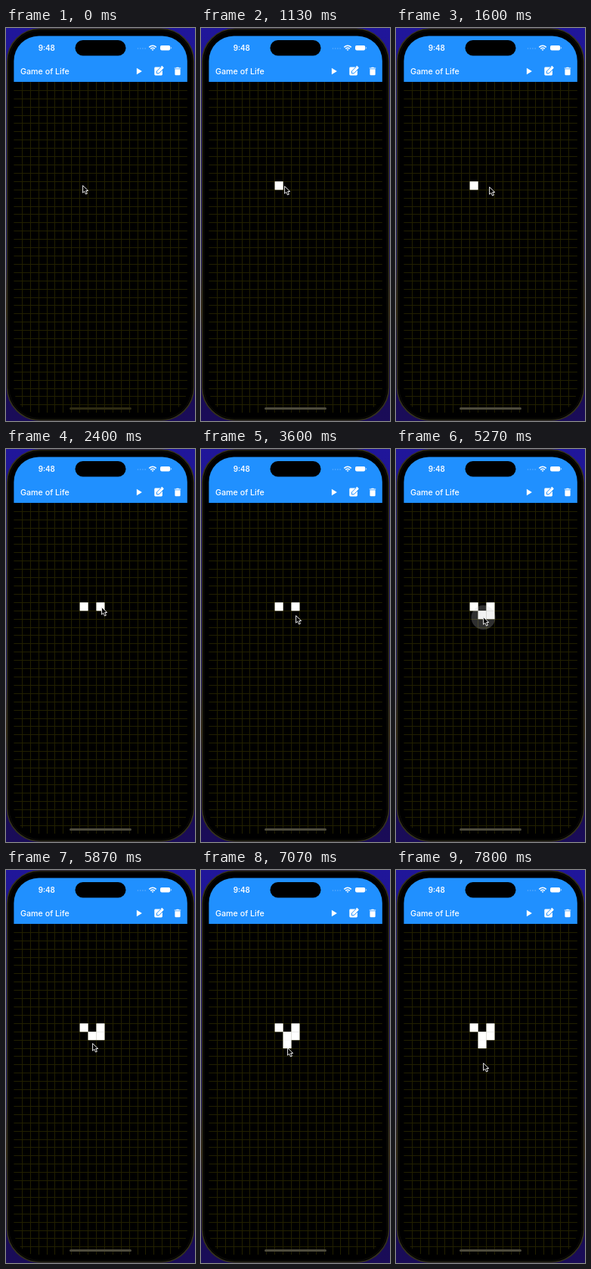
Animation, 250 px wide and 518 px high, one loop 8 s. Source, as an HTML page:

```html
<!DOCTYPE html>
<html lang="en">
<head>
<meta charset="utf-8">
<title>Game of Life</title>
<style>
  html, body { margin: 0; width: 100%; height: 100%; overflow: hidden; background: #000; }
  svg { display: block; width: 100vw; height: 100vh; }
  text { font-family: Inter, Roboto, sans-serif; fill: #fff; }
</style>
</head>
<body>
<svg viewBox="0 0 250 518">
  <defs>
    <linearGradient id="desk" x2="0" y2="1">
      <stop offset="0" stop-color="#20169a"/>
      <stop offset=".6" stop-color="#1c1478"/>
      <stop offset=".66" stop-color="#2c1c30"/>
      <stop offset=".72" stop-color="#342010"/>
      <stop offset=".78" stop-color="#180c50"/>
      <stop offset="1" stop-color="#1a0c58"/>
    </linearGradient>
    <clipPath id="screen"><rect x="10.4" y="10.4" width="229.4" height="497.6" rx="33"/></clipPath>
  </defs>

  <rect width="250" height="518" fill="url(#desk)"/>
  <rect x="1.6" y="1" width="246.8" height="516" rx="43" fill="#000" stroke="#35321c" stroke-width="1.6"/>
  <rect x="4" y="3.2" width="242" height="511.6" rx="40.5" fill="none" stroke="#15140c" stroke-width=".8"/>

  <g clip-path="url(#screen)">
    <path id="grid" stroke="#222000" fill="none" shape-rendering="crispEdges"/>
    <g id="cells" fill="#fff"></g>
    <rect x="10" y="10" width="230" height="61" fill="#2090ff"/>
  </g>
  <rect id="home" x="84" y="500" width="82" height="3" rx="1.5"/>

  <rect x="91.5" y="16" width="67" height="20.5" rx="10.2" fill="#000"/>
  <text x="42.7" y="30" font-size="9.8" font-weight="600">9:48</text>
  <text x="19" y="60.8" font-size="10.7" font-weight="500">Game of Life</text>

  <path d="M174.5 27h9.8" stroke="#fff" stroke-width="1.5" stroke-linecap="round"
    stroke-dasharray="0 3.2" opacity=".3"/>
  <g fill="none" stroke="#fff" stroke-width="1.5">
    <path d="M189.3 25.4Q194 21.2 198.7 25.4M191.2 27.4Q194 25 196.8 27.4"/>
    <path d="M192.6 28.4L194 30L195.4 28.4Q194 27.4 192.6 28.4Z" fill="#fff" stroke="none"/>
  </g>
  <rect x="204" y="23" width="13.2" height="6.4" rx="1.8" fill="#fff"/>
  <path d="M218.2 25v2.4q1-.3 1-1.2t-1-1.2Z" fill="#fff" opacity=".7"/>

  <g fill="#fff">
    <path d="M172.9 52.8V61.2L179.9 57Z"/>
    <rect x="196.3" y="51.6" width="10.6" height="10.8" rx="1.4"/>
    <path d="M199.4 59.9V57L205.6 50.8L208.4 53.6L202.2 59.9Z" stroke="#2090ff" stroke-width="1"/>
    <path d="M204.9 50.9L206.3 49.8L208.8 52.3L207.6 53.5Z"/>
    <path d="M222.8 52.4H225L225.6 51.8H228.4L229 52.4H231.2V53.6H222.8ZM223.4 54.3H230.6V61Q230.6 62.2 229.4 62.2H224.6Q223.4 62.2 223.4 61Z"/>
  </g>

  <circle id="touch" r="16" fill="#c8c8c8"/>
  <path id="cursor" d="M.6 .6V10.2L2.8 8.2L4.5 12L6.4 11.2L4.7 7.5H7.8Z"
    fill="#000" stroke="#e8e8e8" stroke-width="1" stroke-linejoin="round"/>
</svg>
<script>
const LOOP = 8000, LEFT = 9.9, TOP = 70.9, STEP = 10.91;
const $ = id => document.getElementById(id);

// Pointer stops: time, x, y
const stops = [
  [0, 101, 207], [1000, 101, 207], [1130, 110, 208], [1400, 120, 208], [1800, 125, 209],
  [2130, 125, 209], [2330, 126, 208], [2900, 126, 208], [3270, 126, 219],
  [3560, 126, 219], [3600, 125, 219], [4660, 125, 219], [4730, 119, 219], [4930, 115, 221],
  [5560, 115, 221], [5870, 114, 228], [6130, 114, 233], [7030, 114, 233],
  [7070, 114, 234], [7800, 115, 254], [LOOP, 115, 254]
];

// Touches: start, end, centre, and the cell each one fills
const taps = [
  { on: 400, off: 730, x: 102, y: 208, col: 8, row: 12 },
  { on: 1870, off: 2130, x: 125.5, y: 209.5, col: 10, row: 12 },
  { on: 4200, off: 4330, x: 125.5, y: 220.5, col: 10, row: 13 },
  { on: 5130, off: 5330, x: 115.5, y: 222, col: 9, row: 13 },
  { on: 6330, off: 6400, x: 115.5, y: 232.5, col: 9, row: 14 }
];

const line = (origin, i) => Math.round(origin + i * STEP) + .5;

function buildGrid() {
  let d = "";
  for (let c = 1; c < 21; c++) d += `M${line(LEFT, c)} 71V507`;
  for (let r = 1; r < 40; r++) d += `M10 ${line(TOP, r)}H240`;
  $("grid").setAttribute("d", d);
}

function addCell(tap) {
  const rect = document.createElementNS("http://www.w3.org/2000/svg", "rect");
  const attrs = {
    x: LEFT + tap.col * STEP + .4, y: TOP + tap.row * STEP + .4,
    width: STEP + .2, height: STEP + .2
  };
  for (const key in attrs) rect.setAttribute(key, attrs[key]);
  $("cells").append(rect);
  tap.cell = rect;
}

function pointerAt(t) {
  const i = stops.findIndex(s => s[0] > t);
  const [t0, x0, y0] = stops[i - 1], [t1, x1, y1] = stops[i];
  const k = (t - t0) / (t1 - t0);
  return [x0 + (x1 - x0) * k, y0 + (y1 - y0) * k].map(Math.round);
}

function draw(t) {
  $("cursor").setAttribute("transform", `translate(${pointerAt(t)})`);
  $("home").setAttribute("fill", t < 400 ? "#2e2b12" : "#4c4a3c");

  for (const tap of taps) {
    const filled = t >= (tap.on + tap.off) / 2;
    tap.cell.setAttribute("visibility", filled ? "visible" : "hidden");
  }

  const tap = taps.find(p => t >= p.on && t < p.off);
  const touch = $("touch");
  touch.setAttribute("visibility", tap ? "visible" : "hidden");
  if (tap) {
    touch.setAttribute("cx", tap.x);
    touch.setAttribute("cy", tap.y);
    const k = (t - tap.on) / (tap.off - tap.on);
    touch.setAttribute("opacity", .4 * Math.min(1, 2 - 2 * k));
  }
}

buildGrid();
taps.forEach(addCell);
const start = performance.now();
function tick() {
  draw((performance.now() - start) % LOOP);
  requestAnimationFrame(tick);
}
tick();
</script>
</body>
</html>
```
